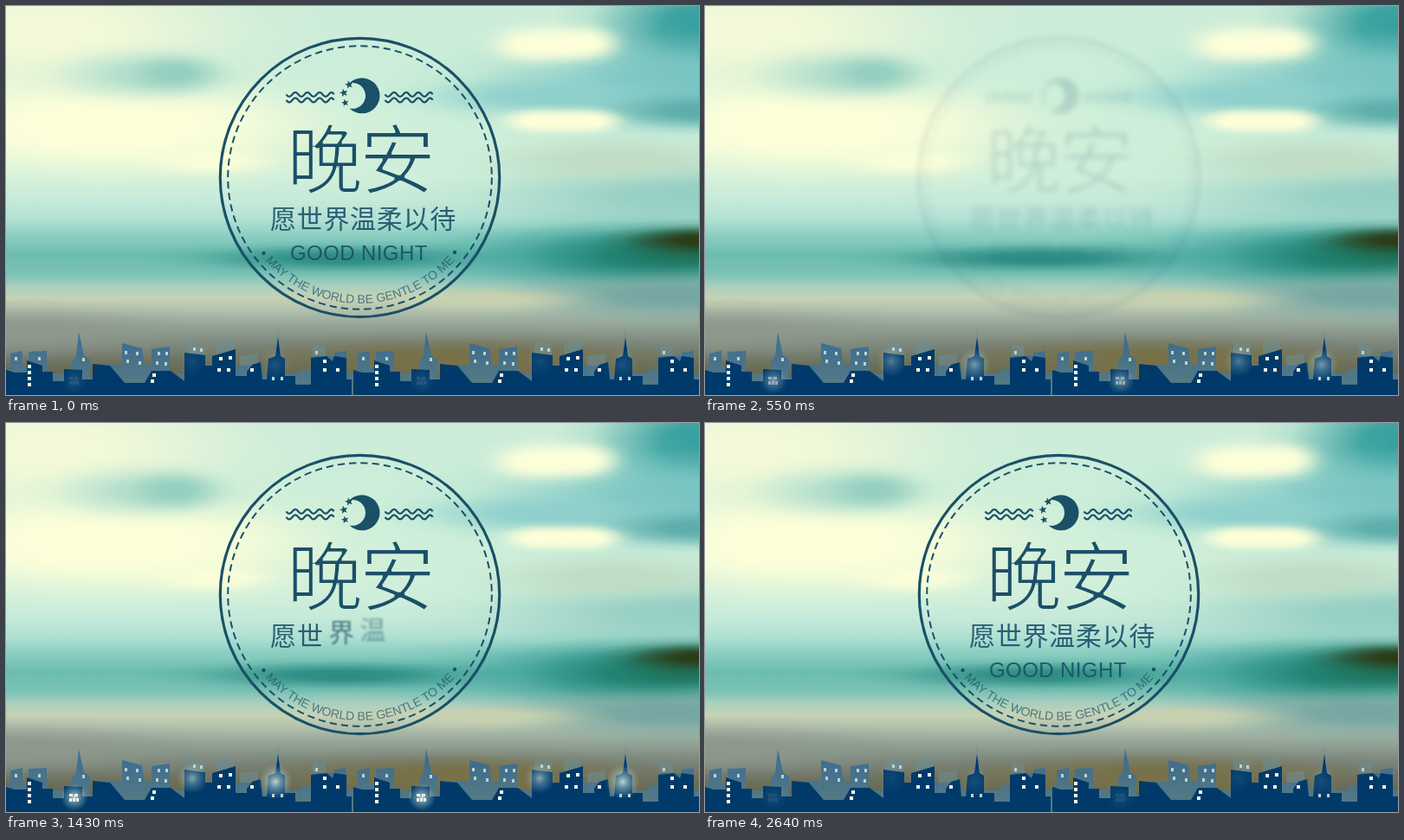
Animation, 800 px wide and 450 px high, one loop 2.75 s. Source, as an HTML page with a canvas:

```html
<!DOCTYPE html>
<html lang="zh">
<head>
<meta charset="utf-8">
<title>晚安</title>
<style>
  html, body { margin: 0; width: 100%; height: 100%; overflow: hidden; }
  canvas, svg { position: absolute; left: 0; top: 0; width: 800px; height: 450px; }
  .cjk { font-family: "Noto Sans CJK SC", "Noto Sans CJK", sans-serif; }
  .latin { font-family: "Liberation Sans", Arial, sans-serif; }
  .line { fill: none; stroke: #1a5068; }
  #emblem { fill: #1a5068; }
</style>
</head>
<body>
<canvas id="sky" width="800" height="450"></canvas>
<svg viewBox="0 0 800 450">
  <defs>
    <filter id="thin"><feMorphology operator="erode" radius="1"/></filter>
    <radialGradient id="halo">
      <stop offset="0" stop-color="#eefae6" stop-opacity=".85"/>
      <stop offset=".35" stop-color="#cfe6dc" stop-opacity=".5"/>
      <stop offset="1" stop-color="#b5d6d2" stop-opacity="0"/>
    </radialGradient>
    <linearGradient id="haze" x2="0" y2="1">
      <stop offset=".2" stop-color="#356b96"/>
      <stop offset=".8" stop-color="#527c8c"/>
    </linearGradient>
    <path id="arc" d="M263 198.5A145.5 145.5 0 0 0 554 198.5"/>
    <path id="wave" d="M0 0q3.5 5 7 0t7 0t7 0t7 0t7 0t7 0t7 0t6 0"/>
    <g id="waves"><use href="#wave" y="102.3"/><use href="#wave" y="108.8"/></g>
    <g id="town">
      <path fill="#6c8f96" fill-opacity=".55" d="M209 450V388L229 391V450ZM243 450V390L263 386V450ZM303 450V408L311 400L314 372L317 400L322 408V450ZM270 450V405L291 402V450ZM354 450V391L369 394V450Z"/>
      <path fill="url(#haze)" fill-opacity=".88" d="M0 450V420H5V402L19 399V418H26V400L47 399V425H76V411L81 405L84 377L90 404L97 409V430H112V415H134V390L157 396L160 415H168V397L189 394V425H207V416H296V425H340V420H354V405H379V401L393 399V425H401V450Z"/>
      <path fill="#003a6b" d="M0 450V421L10 424H24V410L42 416V423H54V434H67V420L88 421V432H100V414L120 416L137 436H160L168 422H190L206 434V401L230 404V416H238V405L265 397V428H278V423L284 415L294 412L296 432H301L303 408L311 405L314 383L317 405L322 408V428H334V438H352V407L370 405L377 411L379 405L393 407V432H399V450Z"/>
      <path id="panes" fill="#fbfbe2"/>
      <path id="dimPanes" fill="#bfd3cb"/>
      <g class="glow">
        <circle cx="79" cy="433" r="16" fill="url(#halo)"/>
        <circle cx="311" cy="415" r="20" fill="url(#halo)"/>
        <circle cx="215" cy="411" r="18" fill="url(#halo)" opacity=".7"/>
        <path fill="#fffff0" d="M73 429h4v3h-4zM79 429h4v3h-4zM73 434h3v4h-3zM77 434h3v4h-3zM81 434h3v4h-3z"/>
      </g>
    </g>
  </defs>

  <use href="#town"/>
  <use href="#town" x="401"/>

  <g id="emblem">
    <g id="ring">
      <circle class="line" cx="408.5" cy="198.5" r="161.2" stroke-width="3.2"/>
      <circle class="line" cx="408.5" cy="198.5" r="152.3" stroke-width="2" stroke-dasharray="8.3 5"/>
      <circle cx="297.5" cy="286" r="2.2"/>
      <circle cx="518" cy="285" r="2.2"/>
      <text class="latin" font-size="14" text-anchor="middle" fill-opacity=".7"><textPath href="#arc" startOffset="50%">MAY THE WORLD BE GENTLE TO ME</textPath></text>
    </g>
    <g id="moon">
      <path d="M396.6 89.2A20.5 20.5 0 1 1 396.6 118.4A15 15 0 1 0 396.6 89.2Z"/>
      <path id="stars"/>
      <g class="line" stroke-width="2.3"><use href="#waves" x="323.5"/><use href="#waves" x="437.5"/></g>
    </g>
  </g>
</svg>
<script>
const LOOP = 2750, STEP = 110, OUT = 660;
const $ = id => document.getElementById(id);
const clamp = v => Math.max(0, Math.min(1, v));

// Sky: a vertical gradient under soft elliptical clouds
function paintSky() {
  const c = $('sky').getContext('2d');
  const base = c.createLinearGradient(0, 0, 0, 450);
  [[0, '#cdecd9'], [.2, '#cbeed9'], [.44, '#d0efda'], [.5, '#c6ead9'], [.55, '#b0e0d3'],
   [.59, '#8bcfc2'], [.64, '#6cbdb0'], [.69, '#7cc2b6'], [.72, '#a8cfbe'], [.75, '#c6d3b5'],
   [.78, '#b4c2ae'], [.82, '#95a598'], [.87, '#7b857a'], [.92, '#6c705c'], [1, '#5c5a40']
  ].forEach(s => base.addColorStop(...s));
  c.fillStyle = base;
  c.fillRect(0, 0, 800, 450);

  const clouds = [
    [50, 30, 330, 110, '#f4fad8'], [110, 138, 380, 90, '#fdffd9'], [130, 140, 280, 60, '#fdffd9'],
    [160, 80, 150, 42, '#b4dfcd'], [195, 78, 75, 30, '#93cfc0'], [240, 180, 110, 24, '#fbfed8'],
    [800, 25, 170, 95, '#2f9c9b'], [790, 90, 340, 80, '#79c5c3'], [620, 105, 200, 32, '#8fd0cc'],
    [800, 122, 150, 28, '#5aacaa'], [800, 220, 360, 60, '#94cec3'], [700, 178, 210, 36, '#c0dcc4'],
    [605, 45, 70, 30, '#fdffd9'], [640, 44, 80, 32, '#fdffd9'], [670, 43, 56, 28, '#fdffd9'],
    [612, 133, 58, 20, '#fdffd9'], [645, 133, 75, 21, '#fdffd9'], [676, 133, 54, 20, '#fdffd9'],
    [390, 292, 240, 22, '#2b8c82'], [710, 288, 310, 52, '#48a9a2'], [745, 290, 200, 46, '#1f8271'],
    [805, 280, 140, 36, '#1f6b50'], [805, 271, 120, 20, '#2c3a14'], [770, 336, 290, 40, '#74a5a2'],
    [560, 340, 150, 20, '#c8d2b0'], [0, 378, 300, 40, '#8d988c'], [520, 408, 300, 34, '#787148']
  ];
  for (const [x, y, rx, ry, color] of clouds) {
    const g = c.createRadialGradient(0, 0, 0, 0, 0, 1);
    [[0, 'ff'], [.25, 'e6'], [.5, '80'], [.75, '20'], [1, '00']]
      .forEach(([at, alpha]) => g.addColorStop(at, color + alpha));
    c.setTransform(rx, 0, 0, ry, x, y);
    c.fillStyle = g;
    c.fillRect(-1, -1, 2, 2);
  }
}

const panes = (list, w, h) => list.map(([x, y]) => `M${x} ${y}h${w}v${h}h${-w}z`).join('');

function star(x, y, r) {
  const pts = Array.from({ length: 10 }, (_, i) => {
    const a = i * Math.PI / 5 - 1.8, d = i % 2 ? r * .42 : r;
    return `${x + d * Math.cos(a)} ${y + d * Math.sin(a)}`;
  });
  return `M${pts.join('L')}Z`;
}

// Lines of text whose letters drop in one after another from the upper right
const lines = [
  { text: '晚安', font: 'cjk', x: 324, y: 209.5, size: 88, gap: -4, start: 807, lag: 93, dur: 270, fade: .45, filter: 'url(#thin)' },
  { text: '愿世界温柔以待', font: 'cjk', x: 305, y: 257, size: 30, gap: .7, alpha: .9, start: 1082, lag: 87, dur: 265, fade: .55 },
  { text: 'GOOD\u00a0NIGHT', font: 'latin', x: 328, y: 294, size: 24, gap: .4, alpha: .9, start: 1755, lag: 80, dur: 160, fade: 2 }
];

function layLine(line) {
  let x = line.x;
  return [...line.text].map((ch, i) => {
    const el = document.createElementNS('http://www.w3.org/2000/svg', 'text');
    el.textContent = ch;
    el.setAttribute('class', line.font);
    el.setAttribute('font-size', line.size);
    el.setAttribute('fill-opacity', line.alpha || 1);
    el.setAttribute('x', x);
    el.setAttribute('y', line.y);
    $('emblem').append(el);
    x += el.getComputedTextLength() + line.gap;
    return { ...line, el, start: line.start + i * line.lag };
  });
}

function pose(el, opacity, blur, dx = 0, dy = 0, filter = '') {
  el.style.opacity = opacity;
  el.style.filter = (blur > .01 ? `${filter} blur(${blur}px)` : filter) || 'none';
  el.setAttribute('transform', `translate(${dx} ${dy})`);
}

paintSky();
$('panes').setAttribute('d',
  panes([[25, 415], [25, 422], [25, 429], [25, 436], [246, 406], [257, 405], [244, 419], [255, 419],
    [169, 425], [167, 432], [282, 419], [366, 409], [366, 419], [381, 419]], 4, 4));
$('dimPanes').setAttribute('d',
  panes([[10, 406], [37, 406], [88, 407], [137, 399], [150, 400], [139, 409], [153, 411], [175, 400],
    [184, 400], [173, 411], [183, 412], [216, 395], [224, 396], [307, 429], [317, 429], [357, 399]], 3, 4));
$('stars').setAttribute('d', star(396, 91, 5) + star(390, 100.5, 5) + star(391.5, 112, 4.5));

const letters = lines.flatMap(layLine);
const glows = document.querySelectorAll('.glow');

function draw(t) {
  const leaving = t < OUT;
  const gone = leaving ? t / OUT : 0;
  pose($('emblem'), 1 - gone, 3.6 * gone);

  const ring = leaving ? 1 : clamp((t - 600) / 330);
  pose($('ring'), ring, 4 * (1 - ring));
  const moon = leaving ? 1 : clamp((t - 560) / 300);
  pose($('moon'), moon, 6 * (1 - moon), 0, 5 * (1 - moon));

  for (const { el, start, dur, fade, filter } of letters) {
    const p = leaving ? 1 : clamp((t - start) / dur), rest = 1 - p;
    pose(el, p ** fade, 2.4 * rest, 17 * rest, -10.5 * rest, filter);
  }

  const pulse = .12 + .44 * (1 - Math.cos(2 * Math.PI * (t + 170) / LOOP));
  glows.forEach(g => g.style.opacity = pulse);
}

const begin = performance.now();
let shown = -1;
function tick() {
  const t = Math.floor(((performance.now() - begin) % LOOP) / STEP) * STEP;
  if (t !== shown) draw(shown = t);
  requestAnimationFrame(tick);
}
tick();
</script>
</body>
</html>
```
